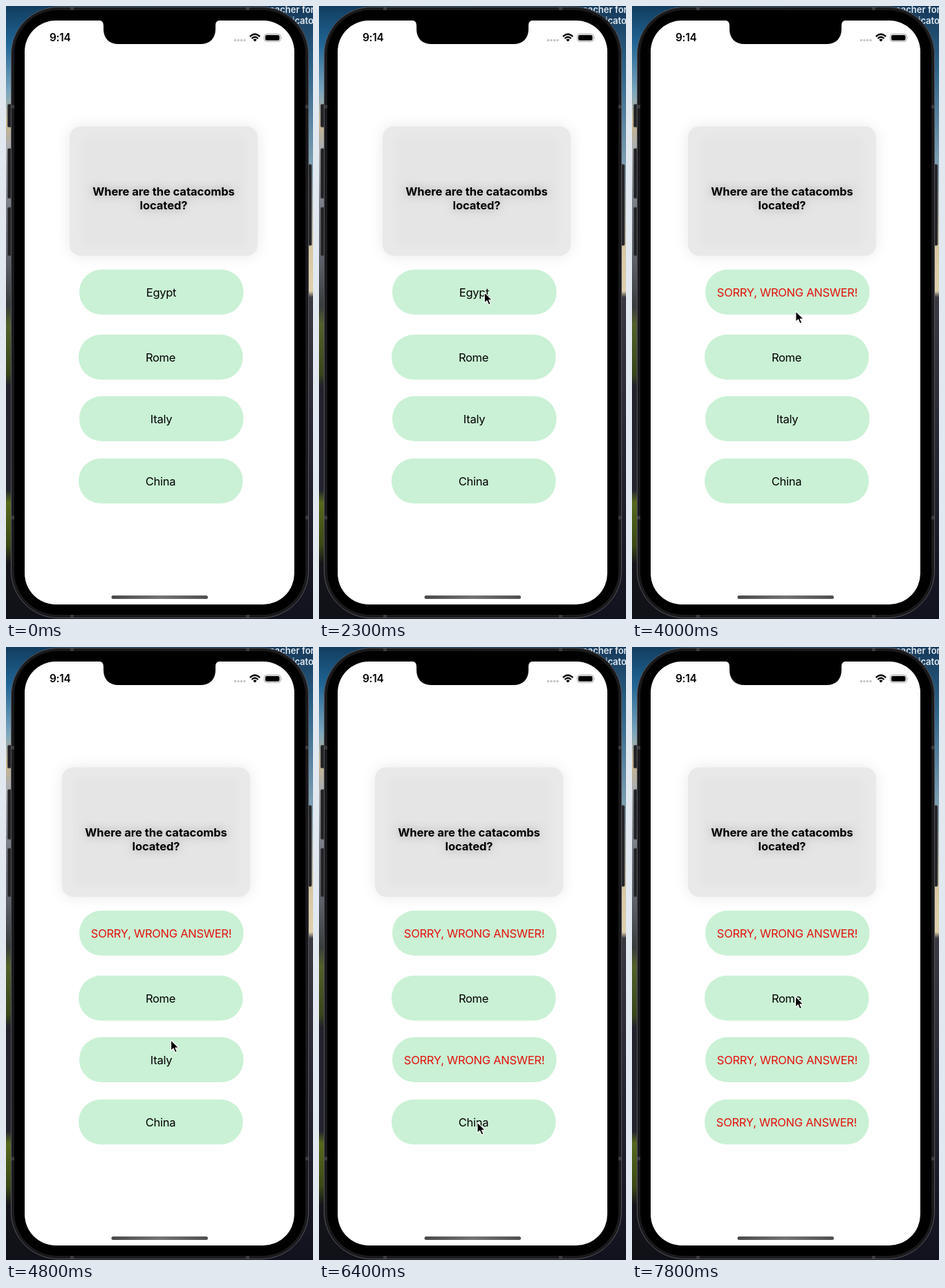
An HTML page that plays this animation: 444x886 px, repeating every 8 s.

```html
<!DOCTYPE html>
<html lang="en">
<head>
<meta charset="utf-8">
<title>Quiz card</title>
<style>
html, body { margin: 0; width: 100%; height: 100%; overflow: hidden; background: #16161d; }
svg { display: block; width: 100%; height: 100%; }
text { font-family: Inter, Roboto, sans-serif; font-size: 16.5px; letter-spacing: -.28px; }
.mid { text-anchor: middle; }
.ask { font-weight: 700; letter-spacing: -.05px; }
.wrong { fill: #e3120b; }
</style>
</head>
<body>
<svg viewBox="0 0 444 886">
  <defs>
    <linearGradient id="left" x2="0" y2="1">
      <stop offset="0" stop-color="#123d5f"/>
      <stop offset=".06" stop-color="#1f6494"/>
      <stop offset=".14" stop-color="#7ca6bd"/>
      <stop offset=".19" stop-color="#c9b48c"/>
      <stop offset=".23" stop-color="#a9adb0"/>
      <stop offset=".33" stop-color="#767b84"/>
      <stop offset=".42" stop-color="#5b5e66"/>
      <stop offset=".49" stop-color="#383c3c"/>
      <stop offset=".52" stop-color="#52602a"/>
      <stop offset=".6" stop-color="#38451b"/>
      <stop offset=".62" stop-color="#22222d"/>
      <stop offset=".79" stop-color="#24242f"/>
      <stop offset=".81" stop-color="#56681c"/>
      <stop offset=".88" stop-color="#3a4716"/>
      <stop offset=".91" stop-color="#15151b"/>
      <stop offset="1" stop-color="#101018"/>
    </linearGradient>
    <linearGradient id="right" x2="0" y2="1">
      <stop offset="0" stop-color="#15395a"/>
      <stop offset=".1" stop-color="#2d6288"/>
      <stop offset=".26" stop-color="#7fa0b3"/>
      <stop offset=".4" stop-color="#d8c7a2"/>
      <stop offset=".465" stop-color="#dfd0ad"/>
      <stop offset=".475" stop-color="#3b3a42"/>
      <stop offset=".7" stop-color="#292935"/>
      <stop offset="1" stop-color="#12121f"/>
    </linearGradient>
    <linearGradient id="bar">
      <stop offset="0" stop-color="#4a4a4a"/>
      <stop offset=".5" stop-color="#747474"/>
      <stop offset="1" stop-color="#505050"/>
    </linearGradient>
    <filter id="halo" x="-30%" y="-30%" width="160%" height="160%"><feGaussianBlur stdDeviation="11"/></filter>
    <filter id="soft" x="-20%" y="-20%" width="140%" height="140%"><feGaussianBlur stdDeviation="4"/></filter>
    <filter id="glow" x="-30%" y="-100%" width="160%" height="300%">
      <feDropShadow dx="0" dy="0" stdDeviation="7" flood-color="#000" flood-opacity=".33"/>
    </filter>
  </defs>

  <!-- desktop -->
  <rect width="222" height="886" fill="url(#left)"/>
  <rect x="222" width="222" height="886" fill="url(#right)"/>
  <g fill="#e4eaf0" font-weight="600">
    <text x="381" y="10" style="font-size:13px;letter-spacing:0">eacher for</text>
    <text x="414" y="26" style="font-size:13px;letter-spacing:0">icator</text>
  </g>

  <!-- phone -->
  <g fill="#232326" stroke="#4b4b50" stroke-width=".8">
    <rect x="2.5" y="142" width="8" height="33" rx="1.5"/>
    <rect x="2.5" y="206" width="8" height="72" rx="1.5"/>
    <rect x="2.5" y="291" width="8" height="70" rx="1.5"/>
    <rect x="434" y="229" width="8" height="117" rx="1.5"/>
  </g>
  <rect x="7.5" y="1.5" width="430" height="883" rx="68" fill="#1a1a1d" stroke="#55565b"/>
  <g fill="#3b3b3f">
    <path d="M8 143h5v5h-5zM432 143h5v5h-5zM8 737h5v5h-5zM432 737h5v5h-5zM93 2h5v4h-5zM93 880h5v4h-5zM347 2h5v4h-5zM347 880h5v4h-5z"/>
  </g>
  <rect x="12" y="6" width="421" height="874" rx="63" fill="#000"/>
  <rect x="27" y="21" width="390" height="844" rx="45" fill="#fff"/>
  <path d="M133 20.500C139 21 141 23 141 29V33C141 47 149 55 163 55H281C295 55 303 47 303 33V29C303 23 305 21 311 20.500Z"/>

  <!-- status bar -->
  <text x="63" y="51.300" font-weight="600" style="font-size:15.300px;letter-spacing:-.2px">9:14</text>
  <g fill="#c4c4c6">
    <circle cx="331.500" cy="49.500" r="1.700"/><circle cx="336" cy="49.500" r="1.700"/>
    <circle cx="340.500" cy="49.500" r="1.700"/><circle cx="345" cy="49.500" r="1.700"/>
  </g>
  <g fill="none" stroke="#000" stroke-width="2.300">
    <path d="M352.800 44.200Q360 37.300 367.200 44.200M355.400 47Q360 42.600 364.600 47"/>
  </g>
  <path d="M360 51.500L357.300 48.700Q360 46.500 362.700 48.700Z"/>
  <rect x="373.500" y="40.500" width="23.500" height="10.800" rx="3.300" fill="none" stroke="#a0a0a2"/>
  <rect x="375" y="42" width="20.500" height="7.800" rx="2"/>
  <path d="M398.200 44V48Q399.800 46 398.200 44Z" fill="#a0a0a2"/>

  <!-- question -->
  <g id="card">
    <rect y="174" width="272" height="187" rx="16" fill="#000" opacity=".085" filter="url(#halo)"/>
    <rect y="174" width="272" height="187" rx="16" fill="#e9e9e9"/>
    <rect x="17" y="188" width="238" height="159" rx="10" fill="#e5e5e5" filter="url(#soft)"/>
    <g filter="url(#glow)">
      <text class="mid ask" x="136" y="274">Where are the catacombs</text>
      <text class="mid ask" x="136" y="294">located?</text>
    </g>
  </g>

  <g id="answers"></g>
  <rect x="152.500" y="852" width="139.500" height="5" rx="2.500" fill="url(#bar)"/>

  <path id="cursor" d="M.5 0V15.500L4.100 12.200L6.600 18L9.400 16.800L6.900 11.200H11.600Z"
        stroke="#fff" stroke-width="1.100" stroke-linejoin="round"/>
</svg>

<script>
const LOOP = 8000, STEP = 100;
const REST = 81, START = 92;
const NEVER = Infinity;

// label, left, top, time of the tap
const answers = [
  ["Egypt", 106, 381, 2475],
  ["Rome", 105, 475, NEVER],
  ["Italy", 106, 564, 5490],
  ["China", 105, 654, 6485]
];

// time, x, y of the pointer tip
const path = [
  [600, 450, 575], [800, 398, 528], [1000, 326, 462], [1200, 264, 412],
  [1400, 259, 416], [1500, 259, 416], [1700, 250, 418], [1900, 246, 417],
  [2400, 237, 413], [3800, 237, 413], [4100, 236, 455], [4400, 236, 545],
  [4600, 236, 581], [4800, 238, 568], [5000, 238, 568], [5300, 240, 584],
  [5900, 240, 584], [6100, 230, 692], [6300, 229, 690], [6500, 228, 684],
  [6900, 228, 684], [7100, 224, 671], [7300, 222, 610], [7500, 246, 545],
  [7700, 239, 510], [7800, 236, 505], [8000, 236, 505]
];

const $ = id => document.getElementById(id);
const move = (el, x, y) => el.setAttribute("transform", `translate(${x} ${y})`);

function add(parent, tag, attrs) {
  const el = document.createElementNS("http://www.w3.org/2000/svg", tag);
  for (const k in attrs) el.setAttribute(k, attrs[k]);
  return parent.appendChild(el);
}

const labels = answers.map(([, x, y]) => {
  add($("answers"), "rect", { x, y, width: 237.5, height: 65, rx: 32, fill: "#caf1d5" });
  return add($("answers"), "text", { x: x + 118.5, y: y + 38.6, class: "mid" });
});

// Each tap kicks the card, which then rings down to rest.
function cardX(t) {
  const taps = answers.map(a => a[3]).filter(at => at <= t);
  if (!taps.length) return START;
  const last = Math.max(...taps), s = (t - last) / 1000;
  if (s > .8) return REST;
  const kick = taps.length === 1 ? START - REST : 15;
  return REST + kick * Math.exp(-4.2 * s) * Math.cos(2 * Math.PI * s / .21);
}

function pointer(t) {
  const i = path.findIndex(p => p[0] > t);
  if (i < 1) return null;
  const [t0, x0, y0] = path[i - 1], [t1, x1, y1] = path[i];
  const k = (t - t0) / (t1 - t0);
  return [x0 + (x1 - x0) * k, y0 + (y1 - y0) * k];
}

function draw(now) {
  const t = Math.floor(now % LOOP / STEP) * STEP;
  move($("card"), cardX(t), 0);
  answers.forEach(([name, , , tap], i) => {
    const wrong = t >= tap;
    labels[i].textContent = wrong ? "SORRY, WRONG ANSWER!" : name;
    labels[i].classList.toggle("wrong", wrong);
  });
  const p = pointer(t);
  $("cursor").style.display = p ? "" : "none";
  if (p) move($("cursor"), p[0], p[1]);
}

const begin = performance.now();
function tick() {
  draw(performance.now() - begin);
  requestAnimationFrame(tick);
}
tick();
</script>
</body>
</html>
```
